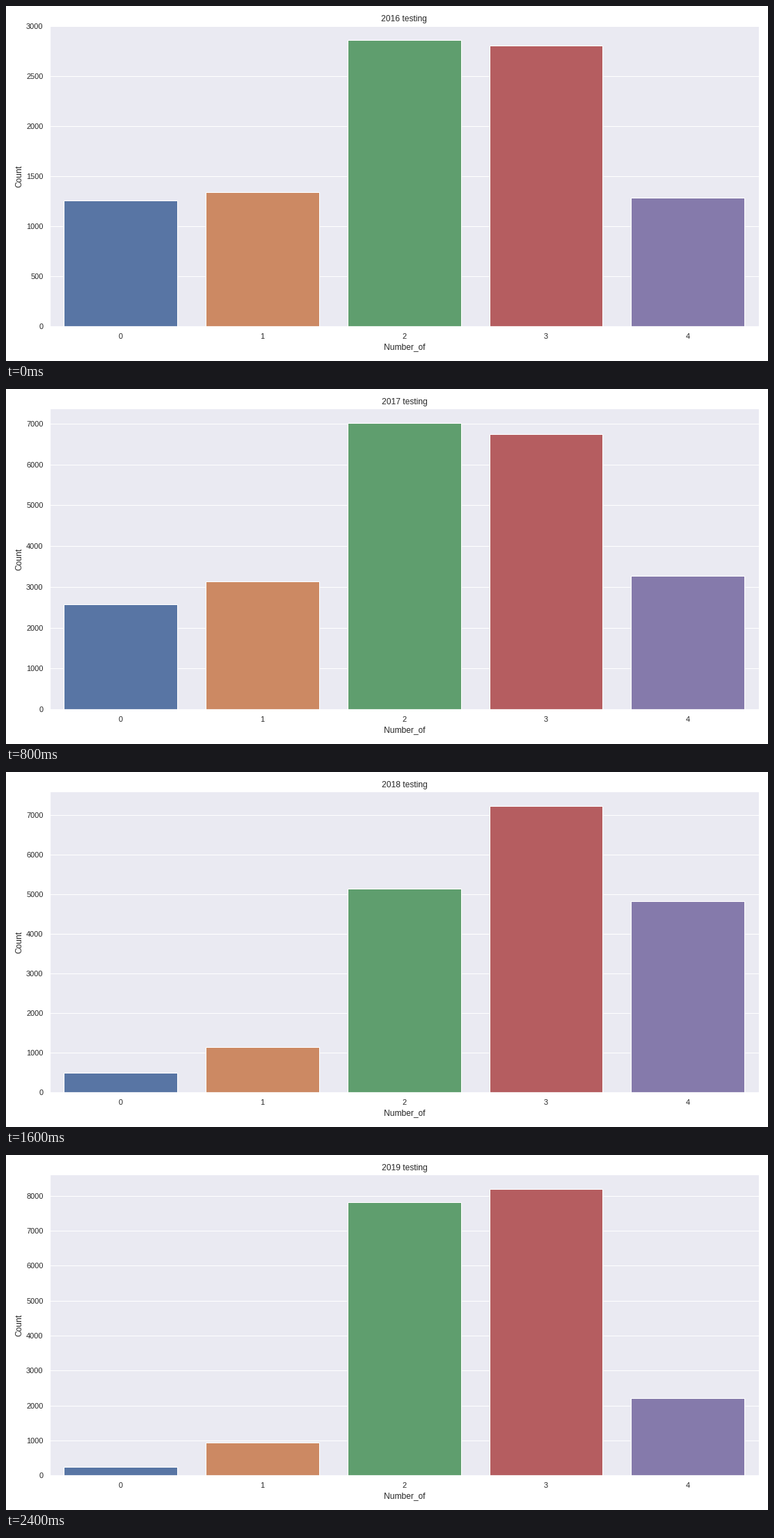
Write a matplotlib script that moves like this. It is 1095 by 511 pixels and loops after 3200 ms.

```python
import matplotlib.pyplot as plt
from matplotlib.animation import FuncAnimation

W, H, DPI = 1095, 511, 72
INK = "#262626"
PALETTE = ["#5875a4", "#cc8963", "#5f9e6e", "#b55d60", "#857aab"]

# Bar heights for each year
COUNTS = {
    2016: [1259, 1344, 2865, 2807, 1287],
    2017: [2574, 3137, 7016, 6748, 3271],
    2018: [499, 1137, 5146, 7235, 4829],
    2019: [242, 937, 7814, 8197, 2202],
}
YEARS = list(COUNTS)

plt.rc("font", family="Liberation Sans")
plt.rc("text", color=INK)
plt.rc("axes", labelcolor=INK, labelsize=12, titlesize=12, facecolor="#eaeaf2",
       edgecolor="white", linewidth=1.25, axisbelow=True)
plt.rc("grid", color="white", linewidth=1)
for tick in ("xtick", "ytick"):
    plt.rc(tick, color=INK, labelsize=11)
    plt.rc(f"{tick}.major", size=6)
plt.rc("xtick", bottom=False)
plt.rc("ytick", left=False)


def add_plot(fig, left, top, right, bottom):
    """Axes placed by pixel edges, measured from the top left."""
    return fig.add_axes([left / W, 1 - bottom / H,
                         (right - left) / W, (bottom - top) / H])


fig = plt.figure(figsize=(W / DPI, H / DPI), dpi=DPI, facecolor="white")
ax = add_plot(fig, 63.1, 28.2, 1081.54, 461.1)


def draw(i):
    year = YEARS[i]
    counts = COUNTS[year]
    slots = range(len(counts))
    ax.clear()
    ax.bar(slots, counts, width=0.8, color=PALETTE, edgecolor="white", linewidth=1)
    ax.set(xlim=(-0.5, len(counts) - 0.5), ylim=(0, max(counts) * 1.05),
           xticks=slots, title=f"{year} testing", xlabel="Number_of", ylabel="Count")
    ax.grid(axis="y")
    return []


anim = FuncAnimation(fig, draw, frames=len(YEARS), init_func=lambda: draw(0),
                     interval=800, repeat=True, repeat_delay=0)
plt.show()
```
